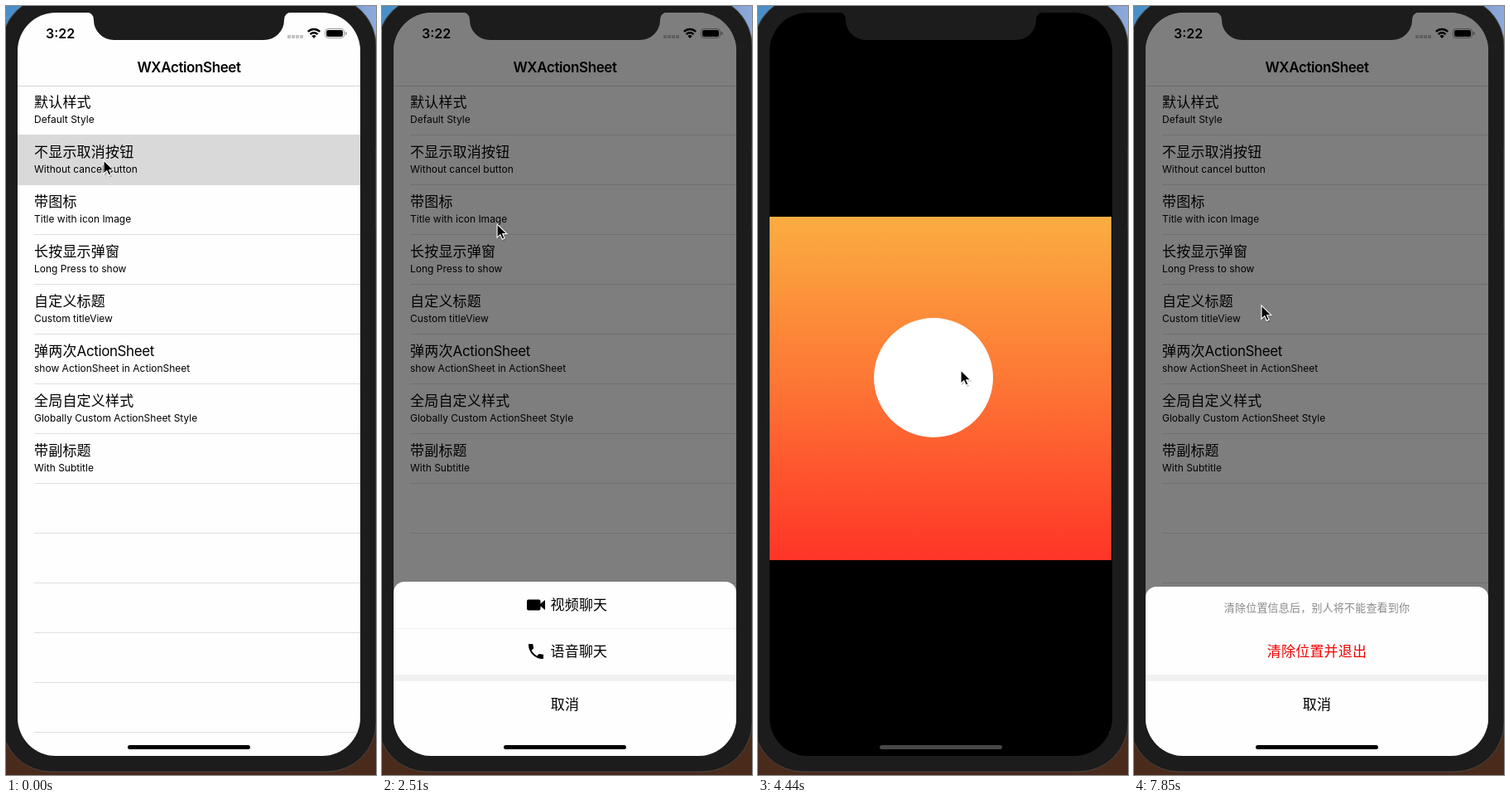
Write an HTML page that moves like this. It is 447 px wide and 927 px high and loops after 8000 ms.

```html
<!DOCTYPE html>
<html lang="zh-CN">
<head>
<meta charset="utf-8">
<title>WXActionSheet</title>
<style>
html, body { margin: 0; width: 100%; height: 100%; overflow: hidden; background: #1c1c1c; }
svg { display: block; width: 447px; height: 927px; }
text { font-family: Inter, "Noto Sans CJK SC", "Noto Sans CJK", sans-serif; }
.cjk { font-family: "Noto Sans CJK SC", "Noto Sans CJK", sans-serif; font-size: 17px; letter-spacing: .2px; }
.cjk tspan { font-family: Inter, sans-serif; letter-spacing: -.4px; }
.sub { font-size: 12px; }
.hint { font-size: 13px; fill: #8a8a8a; }
.mid { text-anchor: middle; }
</style>
</head>
<body>
<svg viewBox="0 0 447 927">
  <defs>
    <clipPath id="glass"><rect x="14" y="8" width="414" height="896" rx="46"/></clipPath>
    <linearGradient id="sky">
      <stop offset="0" stop-color="#4a8fc7"/><stop offset=".9" stop-color="#6d93cf"/><stop offset="1" stop-color="#8fabdb"/>
    </linearGradient>
    <linearGradient id="sunset" x2="0" y2="1">
      <stop offset="0" stop-color="#fbad41"/><stop offset=".5" stop-color="#fd7434"/><stop offset="1" stop-color="#ff3427"/>
    </linearGradient>
  </defs>

  <rect width="447" height="460" fill="url(#sky)"/>
  <rect y="460" width="447" height="467" fill="#4a2a1b"/>
  <rect x="-5" y="-11" width="452" height="934" rx="59" fill="#1c1c1c" stroke="#4a4542"/>
  <path d="M446.5 170v99" stroke="#3a3a3a"/>

  <g clip-path="url(#glass)">
    <rect id="page" x="14" y="8" width="414" height="896" fill="#fefefe"/>
    <g id="status">
      <text x="48" y="38.5" font-size="16" font-weight="600">3:22</text>
      <path d="M340 37h19" stroke="#c3c3c3" stroke-width="4" stroke-dasharray="4 1"/>
      <g fill="none" stroke="#000" stroke-width="2.5">
        <path d="M364.8 30.9a10.2 10.2 0 0 1 14.4 0M367.6 34.1a6.2 6.2 0 0 1 8.8 0"/>
      </g>
      <path d="M372 39l-2.6-2.8a3.7 3.7 0 0 1 5.2 0z"/>
      <rect x="385.5" y="27.5" width="23" height="11" rx="3.2" fill="none" stroke="#999"/>
      <rect x="387" y="29" width="20" height="8" rx="2"/>
      <path d="M409.8 31a2 2 0 0 1 0 4z" fill="#999"/>
    </g>
    <text class="mid" x="221" y="80" font-size="17" font-weight="600" letter-spacing="-.4">WXActionSheet</text>
    <rect x="14" y="96" width="414" height="1" fill="#d6d6d6"/>
    <g id="lines" fill="#dfdfe0"></g>
    <rect id="pressed" x="14" width="414" height="61" fill="#d9d9d9"/>
    <g id="rows"></g>

    <g id="modal">
      <rect x="14" y="8" width="414" height="896"/>
      <rect x="14" y="254" width="413" height="414" fill="url(#sunset)"/>
      <circle cx="212" cy="448" r="72" fill="#fff"/>
    </g>

    <rect id="dim" x="14" y="8" width="414" height="896"/>
    <g id="sheets"></g>
  </g>

  <path d="M97 7.5Q106 8 106 17A24.500 24 0 0 0 130.500 41H311.500A24.500 24 0 0 0 336 17Q336 8 345 7.500Z" fill="#1c1c1c"/>
  <rect id="home" x="147" y="891" width="148" height="5" rx="2.5"/>
  <g id="cursor">
    <path d="M1 1.5v17l4-3.600 2.500 5.600 3-1.300-2.500-5.400h5.500z" fill="#000" opacity=".18"/>
    <path d="M0 0V16.200L3.800 12.700L6.300 18.300L9 17.100L6.600 11.700H11.800Z" stroke="#fff" stroke-width="1.1"/>
  </g>
</svg>

<script>
const $ = id => document.getElementById(id);
const LOOP = 8000, STEPS = 54, SCREEN = 896, BOTTOM = 904, ROW = 56;

const menu = [
  ['默认样式', 'Default Style'],
  ['不显示取消按钮', 'Without cancel button'],
  ['带图标', 'Title with icon Image'],
  ['长按显示弹窗', 'Long Press to show'],
  ['自定义标题', 'Custom titleView'],
  ['弹两次<tspan>ActionSheet</tspan>', 'show ActionSheet in ActionSheet'],
  ['全局自定义样式', 'Globally Custom ActionSheet Style'],
  ['带副标题', 'With Subtitle']
];
$('rows').innerHTML = menu.map(([name, note], i) =>
  `<text class="cjk" x="34" y="${122 + 60 * i}">${name}</text>
   <text class="sub" x="34" y="${141 + 60 * i}">${note}</text>`).join('');
$('lines').innerHTML = Array.from({ length: 13 }, (_, i) =>
  `<rect x="34" y="${155 + 60 * i}" width="394" height="1"/>`).join('');

const video = '<path d="M177 21.500h12.500q2 0 2 2v3l5.500-4.500v12l-5.500-4.500v3q0 2-2 2H177q-2 0-2-2v-9q0-2 2-2z"/>';
const phone = '<path transform="translate(174 16)" d="M6.600 10.800c1.400 2.800 3.800 5.100 6.600 6.600l2.200-2.200c.3-.3.7-.4 1-.2 1.100.4 2.300.6 3.600.6.600 0 1 .4 1 1V20c0 .6-.4 1-1 1C10.600 21 3 13.400 3 4c0-.6.4-1 1-1h3.500c.6 0 1 .4 1 1 0 1.300.2 2.500.6 3.600.1.300 0 .7-.2 1z"/>';

// open and close are the times at which each slide begins
const sheets = [
  { open: 40, close: 1420, items: ['发送给朋友', '收藏', '保存图片'], noCancel: true },
  { open: 2150, close: 3163, items: ['视频聊天', '语音聊天'], icons: [video, phone] },
  { open: 5100, close: 5920.5, items: ['发送给朋友', '收藏', '保存图片'] },
  { open: 7600, close: 9000, items: ['清除位置并退出'], color: '#f20000',
    hint: '清除位置信息后，别人将不能查看到你' }
];

function buildSheet(s) {
  const label = (txt, y, color = '#000') =>
    `<text class="cjk mid" x="221" y="${y + 34}" fill="${color}">${txt}</text>`;
  let y = s.hint ? 50 : 0, body = '';
  if (s.hint) body += '<text class="cjk mid hint" x="221" y="29.8">' + s.hint + '</text>';
  s.items.forEach((txt, i) => {
    if (i) body += `<rect x="14" y="${y}" width="414" height="1" fill="#efefef"/>`;
    body += s.icons
      ? `<g transform="translate(0 ${y})">${s.icons[i]}</g><text class="cjk" x="203.5" y="${y + 34}">${txt}</text>`
      : label(txt, y, s.color);
    y += ROW;
  });
  if (!s.noCancel) {
    body += `<rect x="14" y="${y}" width="414" height="8" fill="#f1f1f1"/>` + label('取消', y + 8);
    y += 8 + ROW;
  }
  s.height = y + 34;
  s.node = document.createElementNS('http://www.w3.org/2000/svg', 'g');
  s.node.innerHTML = `<rect x="14" width="414" height="${s.height + 20}" rx="13" fill="#fefefe"/>` + body;
  $('sheets').append(s.node);
}
sheets.forEach(buildSheet);

// [time, x, y]
const path = [
  [0, 118, 186], [300, 118, 186], [1180, 137, 250], [2350, 137, 250],
  [2960, 148, 319], [3720, 148, 319], [4290, 245, 439], [5450, 245, 439],
  [5930, 225, 353], [6560, 225, 353], [7260, 154, 361], [LOOP, 154, 361]
];
// [from, to, row]
const presses = [[0, 100, 1], [1900, 2250, 2], [3550, 4050, 3], [7350, 7650, 4]];

const clamp = v => Math.min(1, Math.max(0, v));
const ease = v => (v = clamp(v), v * v * (3 - 2 * v));
const slide = (t, start) => ease((t - start) / 250);
// critically damped spring: the part still to go
const rest = (t, start) => {
  const x = Math.max(0, t - start) * 0.0188;
  return (1 + x) * Math.exp(-x);
};
const move = (node, x, y) => node.setAttribute('transform', `translate(${x} ${y})`);

function pointer(t) {
  const i = path.findIndex(p => p[0] > t);
  const [t0, x0, y0] = path[i - 1], [t1, x1, y1] = path[i];
  const k = ease((t - t0) / (t1 - t0));
  return [x0 + (x1 - x0) * k, y0 + (y1 - y0) * k];
}

function draw(t) {
  let shown = 0;
  for (const s of sheets) {
    const k = slide(t, s.open) - slide(t, s.close);
    s.node.style.display = k > 0 ? '' : 'none';
    move(s.node, 0, Math.round(BOTTOM - s.height * k));
    shown = Math.max(shown, k);
  }
  $('dim').style.opacity = shown / 2;

  const drop = Math.round(SCREEN * (t < 5000 ? rest(t, 3915) : 1 - rest(t, 6371)));
  move($('modal'), 0, drop);
  // the page ends where the modal begins, so no white shows at its edges
  $('page').setAttribute('height', drop);
  $('home').setAttribute('fill', drop < 883 && shown < .1 ? '#484848' : '#000');

  const press = presses.find(p => t >= p[0] && t < p[1]);
  $('pressed').style.display = press ? '' : 'none';
  if (press) $('pressed').setAttribute('y', 155 + 60 * (press[2] - 1));

  move($('cursor'), ...pointer(t));
}

const begin = performance.now();
function tick(now) {
  const t = Math.max(0, now - begin) % LOOP;
  const step = Math.min(STEPS - 1, Math.floor((t + 12) * STEPS / LOOP));
  draw(step * LOOP / STEPS);
  requestAnimationFrame(tick);
}
draw(0);
requestAnimationFrame(tick);
</script>
</body>
</html>
```
